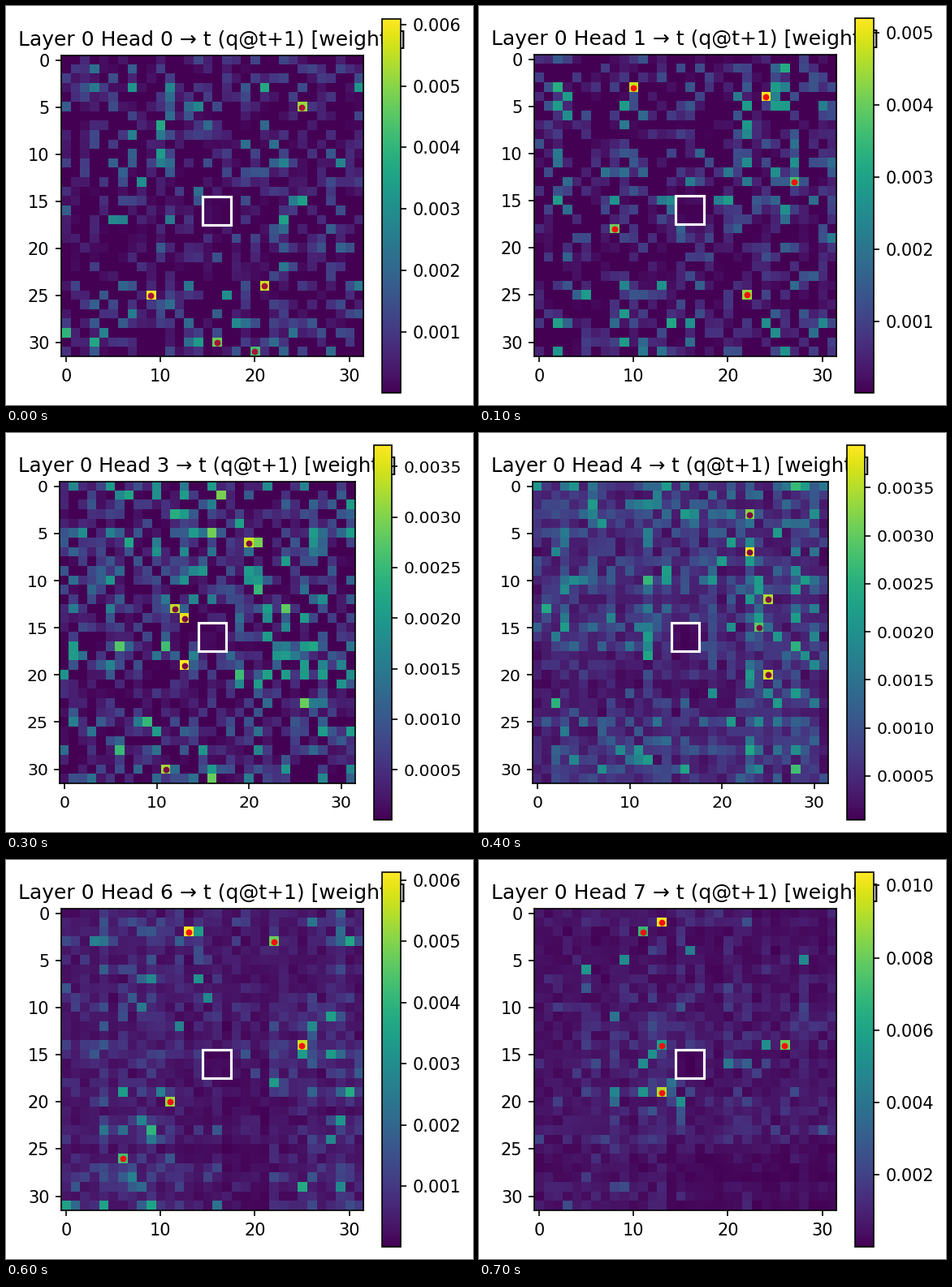
Write a matplotlib script that moves like this. It is 575 by 492 pixels and loops after 800 ms.

```python
import matplotlib.pyplot as plt
import numpy as np
from matplotlib.animation import FuncAnimation
from matplotlib.patches import Rectangle

W, H, DPI = 575, 492, 150
N = 32
RED, CRIMSON, PLUM = "#f5100f", "#a8123a", "#7d0a46"
heads = []


def sparse_noise(rng, level):
    """Mostly empty cells with a half-normal tail."""
    return np.clip(rng.normal(level, 0.14 + level / 2, (N, N)), 0, None)


def dense_noise(rng, level):
    """Low values everywhere with a long tail."""
    return level * rng.lognormal(0, 0.6, (N, N))


def streaks(rng):
    """Random gain for whole rows and columns."""
    return rng.lognormal(0, 0.25, (N, 1)) * rng.lognormal(0, 0.25, (1, N))


def add_head(noise, level, high, peaks, weakest, sparks, bright, dark,
             low=5e-6, dot=RED, top=60):
    """Peaks run from strongest to weakest; bright and dark are boxes (x0, y0, x1, y1)."""
    rng = np.random.default_rng(40 + len(heads))
    gain = streaks(rng)
    for box, factor in ((bright, 1.6), (dark, 0.45)):
        x0, y0, x1, y1 = box
        gain[y0:y1, x0:x1] *= factor
    grid = np.clip(noise(rng, level) * gain, 0, 0.55)

    # Scattered bright cells, likelier where the gain is high.
    odds = (gain ** 2 / (gain ** 2).sum()).ravel()
    cells = rng.choice(N * N, sparks, replace=False, p=odds)
    grid.flat[cells] = rng.uniform(0.4, 0.93 * weakest, sparks)

    grid[15:18, 15:18] = 0.04 * rng.random((3, 3))
    for (x, y), value in zip(peaks, np.linspace(1, weakest, len(peaks))):
        grid[y, x] = value
    heads.append(dict(weights=low + grid * (high - low), low=low, high=high,
                      peaks=peaks, dot=dot, top=top))


add_head(sparse_noise, 0.03, 0.00609, [(9, 25), (21, 24), (25, 5), (16, 30), (20, 31)],
         weakest=0.7, sparks=14, bright=(4, 24, 32, 25), dark=(0, 18, 22, 24),
         dot=CRIMSON, top=61)
add_head(sparse_noise, 0.03, 0.0052, [(24, 4), (10, 3), (22, 25), (8, 18), (27, 13)],
         weakest=0.7, sparks=12, bright=(20, 2, 28, 16), dark=(0, 20, 22, 24))
add_head(sparse_noise, 0.03, 0.00583, [(11, 3), (11, 1), (10, 1), (24, 21), (18, 0)],
         weakest=0.65, sparks=18, bright=(22, 0, 26, 12), dark=(12, 19, 22, 32))
add_head(sparse_noise, 0.1, 0.00371, [(13, 19), (13, 14), (20, 6), (12, 13), (11, 30)],
         weakest=0.86, sparks=28, bright=(22, 13, 27, 21), dark=(1, 20, 18, 24), dot=PLUM)
add_head(dense_noise, 0.13, 0.003943, [(23, 7), (25, 20), (25, 12), (23, 3), (24, 15)],
         weakest=0.75, sparks=22, bright=(23, 6, 26, 32), dark=(0, 18, 22, 24),
         low=4.4e-5, dot=PLUM)
add_head(dense_noise, 0.1, 0.004644, [(11, 3), (0, 26), (28, 28), (8, 4), (7, 25)],
         weakest=0.8, sparks=24, bright=(7, 24, 32, 28), dark=(0, 7, 32, 13), low=3e-5)
add_head(dense_noise, 0.08, 0.00613, [(13, 2), (25, 14), (11, 20), (22, 3), (6, 26)],
         weakest=0.7, sparks=14, bright=(22, 12, 27, 20), dark=(14, 18, 22, 32))
add_head(dense_noise, 0.06, 0.01037, [(13, 1), (13, 19), (26, 14), (11, 2), (13, 14)],
         weakest=0.56, sparks=12, bright=(11, 10, 15, 25), dark=(14, 25, 32, 32))

plt.rcParams["font.family"] = "DejaVu Sans"
# The tiny surplus keeps float rounding from losing a pixel row.
fig = plt.figure(figsize=((W + 1e-6) / DPI, (H + 1e-6) / DPI), dpi=DPI,
                 facecolor="white")


def pixel_axes(left, top, right, bottom):
    return fig.add_axes([left / W, 1 - bottom / H, (right - left) / W, (bottom - top) / H])


def draw(index):
    fig.clear()
    head = heads[index]
    # Labels with four decimals need room, so the whole chart shrinks sideways.
    shrink = 0.977 if head["high"] < 0.004 else 1
    size = 10 * shrink

    ax = pixel_axes(68 * shrink, head["top"], 440 * shrink, 432)
    image = ax.imshow(head["weights"], cmap="viridis", vmin=head["low"], vmax=head["high"],
                      aspect="auto", interpolation="nearest")
    ax.add_patch(Rectangle((14.5, 14.5), 3, 3, fill=False, ec="white", lw=1.5))
    ax.scatter(*zip(*head["peaks"]), s=14, color=head["dot"], linewidths=0)
    ax.set(xlim=(-0.5, N - 0.5), ylim=(N - 0.5, -0.5),
           xticks=range(0, N, 10), yticks=range(0, N, 5))
    ax.tick_params(labelsize=size)
    ax.set_title(f"Layer 0 Head {index} → t (q@t+1) [weights]", fontsize=1.2 * size)

    cax = pixel_axes(463.25 * shrink, head["top"] - 45, 486.35 * shrink, 477)
    fig.colorbar(image, cax=cax).ax.tick_params(labelsize=size)
    return []


anim = FuncAnimation(fig, draw, frames=len(heads), interval=100,
                     init_func=lambda: draw(0), repeat=True, repeat_delay=0, blit=False)
plt.show()
```
